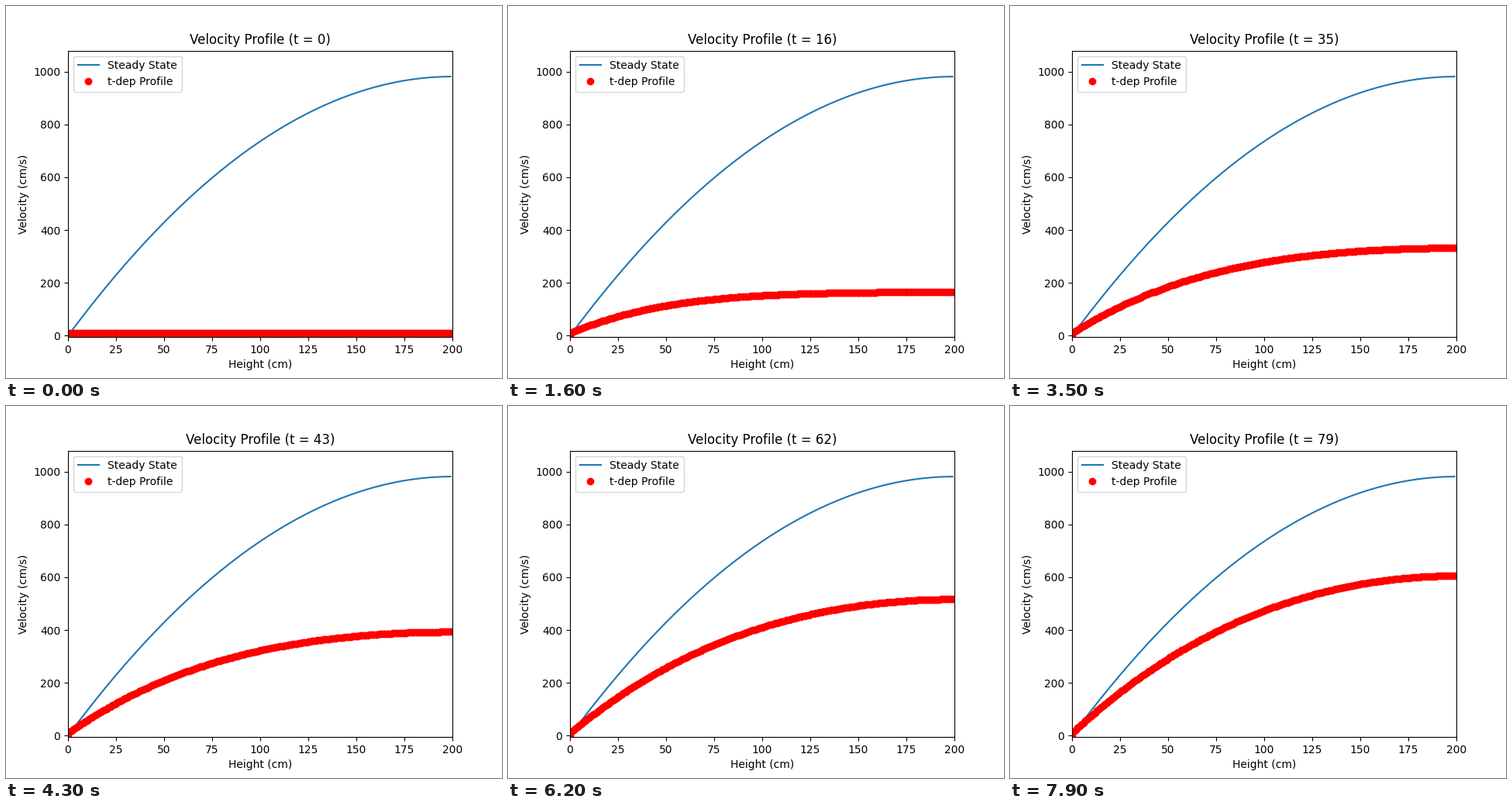
Animation, 640 px wide and 480 px high, one loop 8 s. Source, as a matplotlib script:

```python
import numpy as np
import matplotlib.pyplot as plt
from matplotlib.animation import FuncAnimation

N_GRID = 200
N_STEPS = 80
HEIGHT = 200.0
NU = 200.0      # viscosity, cm^2/s
ACCEL = 9.81    # gravity along the slope, cm/s^2


def implicit_step():
    """Inverse of the backward Euler diffusion matrix (unit dx and dt)."""
    a = (np.diag(np.full(N_GRID, 1 + 2 * NU))
         - NU * (np.eye(N_GRID, k=1) + np.eye(N_GRID, k=-1)))
    a[0, :2] = 1, 0         # no slip at the wall
    a[-1, -1] = 1 + NU      # no stress at the surface
    return np.linalg.inv(a)


def solve():
    step = implicit_step()
    v = np.zeros(N_GRID)
    profiles = []
    for _ in range(N_STEPS):
        v = step @ v
        v[1:] += ACCEL
        profiles.append(v)
    return profiles


x = np.arange(N_GRID)
steady = ACCEL / NU * (HEIGHT * x - x**2 / 2)
profiles = solve()

fig, ax = plt.subplots(figsize=(6.4, 4.8), dpi=100)
ax.plot(x, steady, label="Steady State")
dots, = ax.plot(x, profiles[0], "ro", label="t-dep Profile")
ax.set_xlim(0, HEIGHT)
ax.set_ylim(-5, 1.1 * steady.max())
ax.set_xlabel("Height (cm)")
ax.set_ylabel("Velocity (cm/s)")
ax.legend(loc="upper left")
title = ax.set_title("Velocity Profile (t = 0)")


def update(i):
    dots.set_ydata(profiles[i])
    title.set_text(f"Velocity Profile (t = {i})")
    return dots, title


anim = FuncAnimation(fig, update, frames=N_STEPS, interval=100,
                     repeat=True, repeat_delay=0, blit=False)
plt.show()
```
